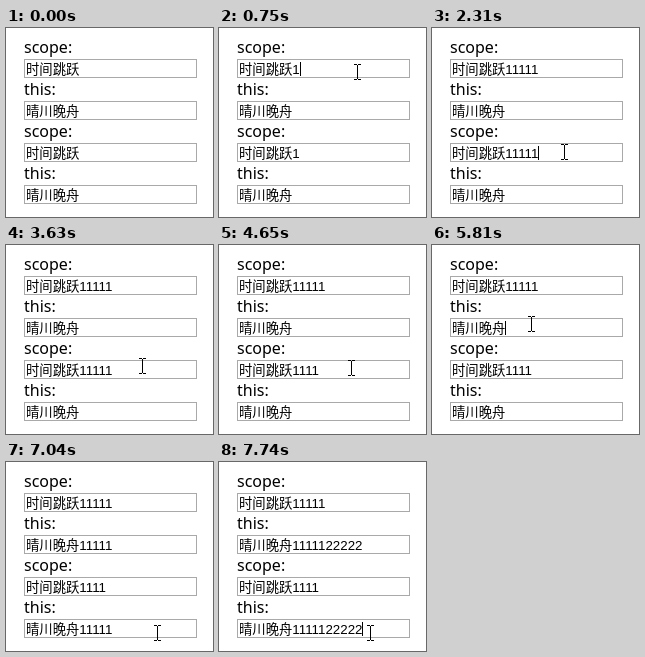
An HTML page for the animation above (8000 ms loop, 207x189 px).

```html
<!DOCTYPE html>
<html lang="zh">
<head>
<meta charset="utf-8">
<style>
  html, body { margin: 0; width: 100%; height: 100%; overflow: hidden; background: #fff; }
  svg { display: block; width: 207px; height: 189px; }
  text { fill: #000; font-kerning: normal; }
  .label { font: 16px "Noto Sans", "Open Sans", sans-serif; }
  .value { font: 13.333px "Liberation Sans", "Noto Sans CJK SC", "Noto Sans CJK", sans-serif; }
  .box { fill: #fff; stroke: #a9a9a9; }
</style>
</head>
<body>
<svg viewBox="0 0 207 189">
  <g id="form"></g>
  <rect id="caret" width="1" height="14"/>
  <path id="beam" fill="none" stroke="#000" d="M-3 -7.5H0M1 -7.5H4M.5 -7V7M-3 7.5H0M1 7.5H4"/>
  <path id="arrow" fill="#fff" stroke="#000" d="M.5 .5V16.5L4.2 12.9L6.8 18.5L9 17.5L6.5 12H11.5Z"/>
</svg>
<script>
const LOOP = 8000;
const PITCH = 42;
const BOX_TOP = 31;
const BOX_HEIGHT = 19;
const TEXT_X = 20;
const BLINK = 530;
const NS = "http://www.w3.org/2000/svg";

const [form, caret, beam, arrow] =
  ["form", "caret", "beam", "arrow"].map(id => document.getElementById(id));

// Editing a row also updates the rows bound to it.
const fields = [
  { label: "scope:", base: "时间跳跃", bound: [0, 2] },
  { label: "this:", base: "晴川晚舟", bound: [1, 3] },
  { label: "scope:", base: "时间跳跃", bound: [2] },
  { label: "this:", base: "晴川晚舟", bound: [1, 3] }
];

const click = (time, row) => ({ time, row, edit: value => value });
const erase = (time, row) => ({ time, row, edit: value => value.slice(0, -1) });
const type = (time, step, row, text) => [...text].map((char, i) =>
  ({ time: time + i * step, row, edit: value => value + char }));

const actions = [
  click(500, 0), ...type(735, 245, 0, "11111"),
  click(2010, 2), erase(4110, 2),
  click(5740, 1), ...type(5950, 140, 1, "11111"),
  click(7050, 3), ...type(7190, 115, 3, "22222")
];

const entry = { time: 130, x: 186, y: 40 };
const moves = [
  { from: 130, to: 480, x: 138, y: 44 },
  { from: 1580, to: 2010, x: 132, y: 124 },
  { from: 2380, to: 2800, x: 136, y: 121 },
  { from: 3630, to: 3900, x: 132, y: 123 },
  { from: 5110, to: 5700, x: 99, y: 79 },
  { from: 5880, to: 6190, x: 162, y: 92 },
  { from: 6560, to: 7050, x: 151, y: 171 }
];

function add(tag, attrs, content = "") {
  const node = document.createElementNS(NS, tag);
  for (const key in attrs) node.setAttribute(key, attrs[key]);
  node.textContent = content;
  return form.appendChild(node);
}

fields.forEach((field, i) => {
  const y = i * PITCH;
  add("text", { class: "label", x: 18, y: y + 25 }, field.label);
  add("rect", { class: "box", x: 18.5, y: y + BOX_TOP + 0.5, width: 172, height: BOX_HEIGHT - 1 });
  field.node = add("text", { class: "value", x: TEXT_X, y: y + 46 });
});

const show = (node, on) => node.setAttribute("visibility", on ? "visible" : "hidden");
const smooth = p => p * p * (3 - 2 * p);

function renderFields(t) {
  const done = actions.filter(action => action.time <= t);
  const values = fields.map(field => field.base);
  for (const { row, edit } of done) {
    for (const target of fields[row].bound) values[target] = edit(values[target]);
  }
  fields.forEach(({ node }, i) => {
    if (node.textContent !== values[i]) node.textContent = values[i];
  });

  const last = done[done.length - 1];
  show(caret, last && (t - last.time) % (2 * BLINK) < BLINK);
  if (last) {
    const width = fields[last.row].node.getComputedTextLength();
    caret.setAttribute("x", Math.round(TEXT_X + width));
    caret.setAttribute("y", last.row * PITCH + 34);
  }
}

function renderPointer(t) {
  let { x, y } = entry;
  for (const move of moves) {
    const p = smooth(Math.min(1, Math.max(0, (t - move.from) / (move.to - move.from))));
    x += (move.x - x) * p;
    y += (move.y - y) * p;
  }
  x = Math.round(x);
  y = Math.round(y);

  const entered = t >= entry.time;
  const overField = (y - BOX_TOP + PITCH) % PITCH < BOX_HEIGHT;
  show(beam, entered && overField);
  show(arrow, entered && !overField);
  (overField ? beam : arrow).setAttribute("transform", `translate(${x} ${y})`);
}

const began = performance.now();
function tick() {
  const t = (performance.now() - began) % LOOP;
  renderFields(t);
  renderPointer(t);
  requestAnimationFrame(tick);
}
tick();
</script>
</body>
</html>
```
